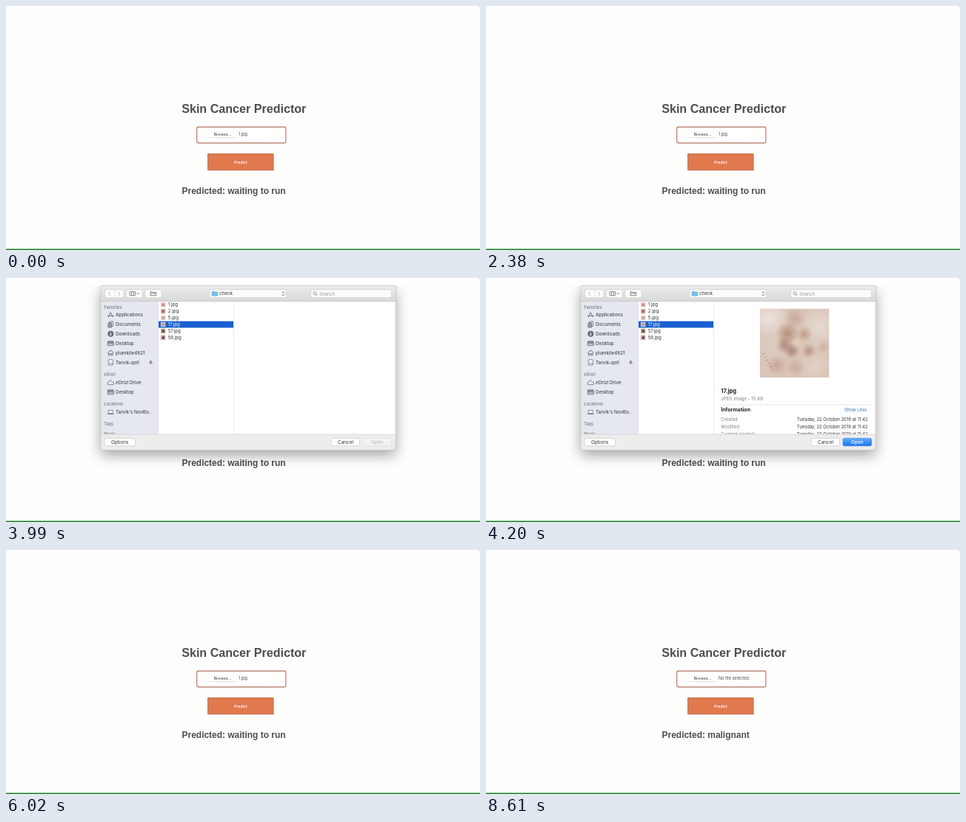
Animation of 640x331 px, one loop 9100 ms. Source, as an HTML page with a canvas:

```html
<!DOCTYPE html>
<html lang="en">
<head>
<meta charset="utf-8">
<title>Skin Cancer Predictor</title>
<style>
  html, body { margin: 0; width: 100%; height: 100%; overflow: hidden; background: #fff; }
  canvas { display: block; width: 640px; height: 331px; }
</style>
</head>
<body>
<canvas id="stage"></canvas>
<script>
const W = 640, H = 331, LOOP = 9100, STEP = 70;
const canvas = document.getElementById('stage');
const ctx = canvas.getContext('2d');
const scale = Math.max(1, window.devicePixelRatio || 1);
canvas.width = W * scale;
canvas.height = H * scale;

const UI = 'Inter, sans-serif';
const HEAD = '"Liberation Sans", Arial, sans-serif';
const INK = '#303236', GRAY = '#7d8086', ICON = '#66696e';

// Moments at which the picture switches, in ms.
const T = { open: 3010, settled: 3220, select: 3990, preview: 4130, close: 6020, picked: 6160, result: 7700 };

function text(str, x, y, size, color = INK, { weight = 400, family = UI, align = 'left' } = {}) {
  ctx.font = `${weight} ${size}px ${family}`;
  ctx.fillStyle = color;
  ctx.textAlign = align;
  ctx.textBaseline = 'alphabetic';
  ctx.fillText(str, x, y);
}

function rect(x, y, w, h, color) {
  ctx.fillStyle = color;
  ctx.fillRect(x, y, w, h);
}

function box(x, y, w, h, r, fill, stroke, line = 0.6) {
  ctx.beginPath();
  ctx.roundRect(x, y, w, h, r);
  if (fill) { ctx.fillStyle = fill; ctx.fill(); }
  if (stroke) { ctx.strokeStyle = stroke; ctx.lineWidth = line; ctx.stroke(); }
}

function path(points, color, line = 0.8, close = false) {
  ctx.beginPath();
  points.forEach(([x, y], i) => i ? ctx.lineTo(x, y) : ctx.moveTo(x, y));
  if (close) ctx.closePath();
  ctx.strokeStyle = color;
  ctx.lineWidth = line;
  ctx.stroke();
}

function disc(x, y, r, color) {
  ctx.beginPath();
  ctx.arc(x, y, r, 0, Math.PI * 2);
  ctx.fillStyle = color;
  ctx.fill();
}

function vertical(y0, y1, top, bottom) {
  const g = ctx.createLinearGradient(0, y0, 0, y1);
  g.addColorStop(0, top);
  g.addColorStop(1, bottom);
  return g;
}

function clipped(x, y, w, h, draw) {
  ctx.save();
  ctx.beginPath();
  ctx.rect(x, y, w, h);
  ctx.clip();
  draw();
  ctx.restore();
}

function page(t) {
  rect(0, 0, W, H, '#fefefe');
  rect(0, 0, 1.2, 1, '#bbb');
  rect(W - 1.2, 0, 1.2, 1, '#bbb');

  const bold = { weight: 700, family: HEAD };
  text('Skin Cancer Predictor', 237.2, 145.3, 16.1, '#4d4d4f', bold);

  box(257.7, 164.1, 120.2, 21.8, 1.8, '#fff', '#b5705f', 1.1);
  box(273, 170.3, 38.5, 8.4, 1, '#fff', '#ececec', 0.5);
  rect(274, 178.3, 37, 0.6, '#d2d2d2');
  text('Browse...', 280.8, 176.4, 5.4, '#333');
  const file = t >= T.result ? 'No file selected.' : t >= T.picked ? '17.jpg' : '1.jpg';
  text(file, 314, 176.4, 5.5, '#4a4a4a');

  box(272.5, 200.5, 88.6, 22.2, 0, '#e0794e', '#bd6d48', 0.9);
  text('Predict', 316.9, 213.6, 5.6, '#fff3ea', { weight: 700, family: 'Lato, sans-serif', align: 'center' });

  const verdict = t >= T.result ? 'malignant' : 'waiting to run';
  text('Predicted: ' + verdict, 237.6, 254.7, 11.95, '#4d4d4f', bold);
  rect(0, 329.5, W, 1.5, '#15801a');
}

const icons = {
  apps(x, y) {
    path([[x - 3.2, y + 3.2], [x, y - 3.4], [x + 3.2, y + 3.2]], ICON, 0.9);
    path([[x - 4.2, y + 1.2], [x + 4.2, y + 1.2]], ICON, 0.9);
  },
  docs(x, y) {
    box(x - 1.4, y - 4, 4.8, 6.4, 0.5, '#e5e9ef', ICON, 0.8);
    box(x - 3.4, y - 2.2, 4.8, 6.2, 0.5, '#9a9da3', ICON, 0.8);
  },
  down(x, y) {
    disc(x, y, 4, ICON);
    path([[x, y - 2.3], [x, y + 2]], '#fff', 0.8);
    path([[x - 1.7, y + 0.3], [x, y + 2.1], [x + 1.7, y + 0.3]], '#fff', 0.8);
  },
  desk(x, y) {
    box(x - 4, y - 3, 8, 6, 0.6, '#9fa3a9', ICON, 0.7);
    path([[x - 3.6, y - 1.5], [x + 3.6, y - 1.5]], ICON, 0.7);
    path([[x - 2.6, y + 1.7], [x + 2.6, y + 1.7]], '#eef0f3', 0.8);
  },
  home(x, y) {
    path([[x - 4.2, y + 0.2], [x, y - 3.6], [x + 4.2, y + 0.2]], ICON, 1);
    path([[x - 2.8, y], [x - 2.8, y + 3.4], [x - 0.9, y + 3.4], [x - 0.9, y + 1], [x + 0.9, y + 1],
      [x + 0.9, y + 3.4], [x + 2.8, y + 3.4], [x + 2.8, y]], ICON, 0.9);
  },
  disk(x, y) {
    box(x - 3.1, y - 3.8, 6.2, 7.6, 0.8, '#eef1f5', ICON, 0.7);
    path([[x - 3, y + 1.6], [x + 3, y + 1.6]], ICON, 0.7);
  },
  cloud(x, y) {
    ctx.beginPath();
    ctx.arc(x - 2.5, y + 1, 1.8, Math.PI / 2, Math.PI * 1.5);
    ctx.arc(x - 0.3, y - 0.7, 2.3, Math.PI * 1.1, Math.PI * 1.9);
    ctx.arc(x + 2.6, y + 1, 1.8, -Math.PI / 2, Math.PI / 2);
    ctx.closePath();
    ctx.strokeStyle = ICON;
    ctx.lineWidth = 0.8;
    ctx.stroke();
  },
  laptop(x, y) {
    box(x - 3, y - 2.7, 6, 4.4, 0.4, '#f0f2f5', ICON, 0.7);
    path([[x - 4.2, y + 2.5], [x + 4.2, y + 2.5]], ICON, 0.9);
  }
};

const places = [
  ['Favorites', 39.5], ['Applications', 50.1, 'apps'], ['Documents', 63, 'docs'],
  ['Downloads', 75.8, 'down'], ['Desktop', 88.8, 'desk'], ['plumkite4821', 101.5, 'home'],
  ['Tarvik-qolt', 114.5, 'disk'], ['eDrizl', 130.8], ['eDrizl Drive', 142, 'cloud'],
  ['Desktop', 154.8, 'desk'], ['Locations', 171], ["Tarvik's NovBo...", 182, 'laptop'],
  ['Tags', 198.2], ['Media', 212.4]
];

function sidebar() {
  rect(128, 32, 77.5, 180, '#e5e9ef');
  clipped(128, 32, 77.5, 179.5, () => {
    for (const [label, y, icon] of places) {
      if (icon) {
        icons[icon](141.3, y);
        text(label, 148, y + 2.2, 6.3);
      } else {
        text(label, 132.3, y + 2, 5.5, '#74777d', { weight: 500 });
      }
    }
    ctx.fillStyle = ICON;
    ctx.beginPath();
    ctx.moveTo(193.3, 114.6);
    ctx.lineTo(195.5, 111.8);
    ctx.lineTo(197.7, 114.6);
    ctx.fill();
    rect(193.3, 115.4, 4.4, 0.9, ICON);
  });
  rect(205.2, 32, 0.6, 180, '#d3d6da');
}

function toolbar() {
  rect(128, 10.5, 398, 21.3, vertical(10, 32, '#ebebeb', '#d9d9d9'));
  rect(128, 31.3, 398, 0.6, '#bdbdbd');
  for (const [x, w] of [[133.5, 25.5], [162.5, 22], [188, 22], [275, 103.5], [411.5, 109]])
    box(x, 15.7, w, 11, 1.8, '#fbfbfb', '#c6c6c6', 0.6);

  rect(146.1, 16, 0.5, 10.4, '#cfcfcf');
  path([[140.8, 18.6], [138.6, 21.2], [140.8, 23.8]], '#a2a2a2', 0.8);
  path([[151.6, 18.6], [153.8, 21.2], [151.6, 23.8]], '#a2a2a2', 0.8);

  box(167, 18.7, 7.6, 5, 0.4, null, '#555', 0.7);
  path([[169.5, 18.7], [169.5, 23.7]], '#555', 0.6);
  path([[172.1, 18.7], [172.1, 23.7]], '#555', 0.6);
  path([[177, 20.4], [178.5, 22], [180, 20.4]], '#555', 0.8);

  path([[195, 23.7], [195, 18.7], [197.3, 18.7], [198.2, 19.5], [202.4, 19.5], [202.4, 23.7]], '#555', 0.7, true);
  path([[195, 20.8], [202.4, 20.8]], '#555', 0.6);

  box(278, 18.2, 3.5, 2, 0.5, '#48a6d6');
  box(278, 18.9, 7.8, 5.4, 0.6, '#6bc4ec', '#48a6d6', 0.4);
  text('check', 288, 23.4, 6.3);
  path([[372.8, 20.3], [374.3, 18.6], [375.8, 20.3]], '#444', 0.8);
  path([[372.8, 22.2], [374.3, 23.9], [375.8, 22.2]], '#444', 0.8);

  ctx.beginPath();
  ctx.arc(417, 20.6, 2, 0, Math.PI * 2);
  ctx.strokeStyle = '#737373';
  ctx.lineWidth = 0.7;
  ctx.stroke();
  path([[418.5, 22.1], [420.2, 23.9]], '#737373', 0.8);
  text('Search', 423, 23.5, 6.3, '#989898');
}

const files = [
  ['1.jpg', '#e3bcb4', '#b98177'], ['2.jpg', '#d49e94', '#965d55'], ['5.jpg', '#dfc8bd', '#b39a8c'],
  ['17.jpg', '#d6bdb0', '#a67b68'], ['57.jpg', '#b58f84', '#49332f'], ['58.jpg', '#c09a9a', '#432e36']
];

function fileList(t) {
  // The list eases down into place just after the panel opens.
  const left = Math.max(0, 1 - (t - T.open) / (T.settled - T.open));
  const shift = -1.4 * left * left;
  clipped(205.8, 32, 101.5, 180, () => {
    files.forEach(([name, skin, spot], i) => {
      const y = 36.3 + i * 8.9 + shift;
      const chosen = i === 3 && t >= T.select;
      if (chosen) rect(205.8, y - 4.4, 101.5, 8.9, '#1b60d1');
      rect(209.2, y - 3.1, 6, 6.2, chosen ? '#f0e7e2' : skin);
      rect(209.7, y - 2.6, 5, 5.2, skin);
      disc(212.3, y, 1.5, spot);
      text(name, 218.7, y + 2, 6.15, chosen ? '#fff' : INK);
    });
  });
  rect(307, 32, 0.6, 180, '#dedede');
}

// Soft blotches: x, y, radius, rgb, alpha.
const blotches = [
  [382, 55, 30, '238,230,225', 0.9], [450, 66, 30, '232,222,215', 0.85], [444, 120, 24, '229,212,200', 0.8],
  [388, 93, 24, '224,207,197', 0.7], [417, 55, 15, '180,137,116', 0.45], [407, 75, 16, '158,109,83', 0.6],
  [403, 91, 12, '139,92,73', 0.55], [430, 76, 11, '174,123,91', 0.55], [413, 99, 11, '133,83,65', 0.55],
  [436, 99, 10, '151,100,77', 0.5], [393, 118, 14, '186,135,115', 0.5], [418, 121, 13, '190,146,122', 0.5],
  [420, 87, 8, '229,208,193', 0.7], [456, 93, 9, '185,145,125', 0.35]
];

function photo(x, y, w, h) {
  clipped(x, y, w, h, () => {
    rect(x, y, w, h, '#d9c4b7');
    for (const [cx, cy, r, rgb, a] of blotches) {
      const g = ctx.createRadialGradient(cx, cy, 0, cx, cy, r);
      g.addColorStop(0, `rgba(${rgb},${a})`);
      g.addColorStop(1, `rgba(${rgb},0)`);
      rect(cx - r, cy - r, r * 2, r * 2, g);
    }
    for (let i = 0; i < 6; i++) {
      const px = 373 + i * 2.5, py = 102 + i * 4.3;
      path([[px, py + 2], [px + 3, py]], 'rgba(91,78,74,.65)', 0.6);
    }
  });
}

function preview() {
  photo(369.7, 41.5, 93.7, 93.5);
  text('17.jpg', 317.3, 156, 7.5, '#222', { weight: 700 });
  text('JPEG image - 15 KB', 317.3, 165.7, 6.1, GRAY);
  rect(317.5, 171.7, 203, 0.6, '#d5d5d5');
  text('Information', 317.3, 181.3, 7, '#222', { weight: 700 });
  text('Show Less', 514.2, 181.3, 5.9, '#2d6cb9', { align: 'right' });
  clipped(308, 170, 217, 41.8, () => {
    ['Created', 'Modified', 'Content created'].forEach((label, i) => {
      const y = 193.8 + i * 10;
      text(label, 317.3, y, 5.9, GRAY);
      text('Tuesday, 22 October 2019 at 11:42', 515.3, y, 5.9, INK, { align: 'right' });
    });
  });
}

function button(label, x, w, active, enabled = true) {
  const fill = active ? vertical(217, 228, '#69b1fa', '#1471ee') : enabled ? '#fff' : '#f3f3f3';
  const edge = active ? '#2779dd' : enabled ? '#c2c2c2' : '#d8d8d8';
  box(x, 217.4, w, 10.4, 1.9, fill, edge, 0.6);
  const color = active ? '#fff' : enabled ? INK : '#b9b9b9';
  text(label, x + w / 2, 224.9, 6.4, color, { align: 'center', weight: active ? 500 : 400 });
}

function dialog(t) {
  const ready = t >= T.preview;
  clipped(0, 10, W, H, () => {
    ctx.save();
    ctx.shadowColor = 'rgba(0,0,0,.36)';
    ctx.shadowBlur = 18 * scale;
    ctx.shadowOffsetY = 7 * scale;
    box(127.8, 10.2, 398.4, 223.2, [2, 2, 4, 4], '#ececec');
    ctx.restore();
  });
  ctx.save();
  ctx.beginPath();
  ctx.roundRect(127.8, 10.2, 398.4, 223.2, [2, 2, 4, 4]);
  ctx.clip();
  toolbar();
  rect(128, 32, 398, 180, '#fff');
  sidebar();
  fileList(t);
  if (ready) preview();
  rect(128, 212, 398, 22, '#ededed');
  rect(128, 211.8, 398, 0.6, '#c9c9c9');
  button('Options', 133, 41.5, false);
  button('Cancel', 439.5, 38, false);
  button('Open', 482, 38.5, ready, ready);
  ctx.restore();
  box(127.8, 10.2, 398.4, 223.2, [2, 2, 4, 4], null, '#b9b9b9', 0.6);
}

const start = performance.now();

function frame(now) {
  const elapsed = Math.max(0, now - start) % LOOP;
  const t = Math.floor(elapsed / STEP) * STEP;
  ctx.setTransform(scale, 0, 0, scale, 0, 0);
  page(t);
  if (t >= T.open && t < T.close) dialog(t);
  requestAnimationFrame(frame);
}
requestAnimationFrame(frame);
</script>
</body>
</html>
```
